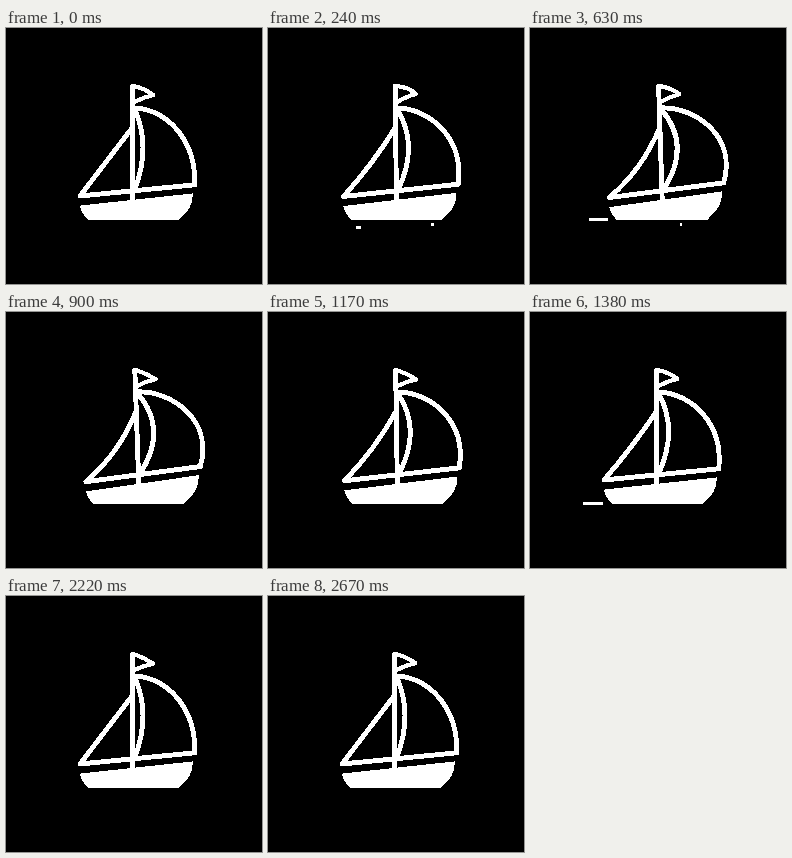
Animation of 256 by 256 pixels, one loop 2700 ms. Source, as an HTML page:

```html
<!DOCTYPE html>
<html lang="en">
<head>
<meta charset="utf-8">
<title>Sailing boat</title>
<style>
html, body { margin: 0; width: 100%; height: 100%; overflow: hidden; background: #000; }
svg { display: block; width: 100%; height: 100%; shape-rendering: crispEdges; }
</style>
</head>
<body>
<svg viewBox="0 0 256 256">
  <defs><clipPath id="water"><rect width="256" height="192"/></clipPath></defs>
  <g clip-path="url(#water)">
    <g id="boat" fill="none" stroke="#fff" stroke-width="4.9" stroke-linejoin="round" stroke-linecap="round">
      <path d="M126.8 58V173"/>
      <path d="M74 168L188.8 156.8"/>
      <path id="jib"/>
      <path id="main"/>
      <path id="flag" stroke-width="4.2"/>
      <path fill="#fff" stroke="none" d="M73.7 177.6L186.8 165.4Q187.5 180 174 190.5L170 195H86Q76 188 73.7 177.6Z"/>
    </g>
  </g>
  <g id="waves" stroke="#fff" stroke-width="3"></g>
</svg>
<script>
const LOOP = 2700;
const $ = id => document.getElementById(id);

// [time, value] pairs
const tilt = [[0, 0], [420, -1.1], [800, -2.1], [900, -2], [1170, -0.85], [1380, 0], [1650, 0.4], [1860, 0.3], [2160, 0], [LOOP, 0]];
const billow = [[0, 0], [420, 0.75], [650, 1], [900, 1], [1170, 0.55], [1380, 0.25], [1700, 0], [LOOP, 0]];

// x is the left end; each line draws leftwards, then wipes out leftwards
const waves = [
  { x: 72, y: 199.5, len: 19, start: 200, span: 430 },
  { x: 144, y: 196.5, len: 20, start: 220, span: 430 },
  { x: 53, y: 191.5, len: 19.5, start: 392, span: 440 },
  { x: 53, y: 191.5, len: 19.5, start: 1195, span: 480 }
];
for (const w of waves) {
  w.el = document.createElementNS('http://www.w3.org/2000/svg', 'line');
  w.el.setAttribute('y1', w.y);
  w.el.setAttribute('y2', w.y);
  $('waves').append(w.el);
}

const clamp = v => Math.max(0, Math.min(1, v));

// Smooth monotone interpolation through the keys
function sample(keys, t) {
  let i = 0;
  while (i < keys.length - 2 && t >= keys[i + 1][0]) i++;
  const slope = k => k < 0 || k > keys.length - 2 ? 0 :
    (keys[k + 1][1] - keys[k][1]) / (keys[k + 1][0] - keys[k][0]);
  const tangent = k => {
    const a = slope(k - 1), b = slope(k);
    return a * b <= 0 ? 0 : 2 * a * b / (a + b);
  };
  const [t0, v0] = keys[i], [t1, v1] = keys[i + 1];
  const d = t1 - t0, u = (t - t0) / d, s = u * u * (3 - 2 * u);
  return v0 + (v1 - v0) * s +
    d * u * (1 - u) * ((1 - u) * tangent(i) - u * tangent(i + 1));
}

function draw(t) {
  const angle = sample(tilt, t);
  const b = sample(billow, t);
  $('boat').setAttribute('transform', `rotate(${angle} 127 0)`);
  $('jib').setAttribute('d', `M74 168Q${100 + 9 * b} ${134 + 6 * b} 126.8 99`);
  $('main').setAttribute('d',
    `M129 80C${160 + 2 * b} ${82 - 2 * b} ${190 + 14 * b} 110 188.8 156.8M129 82Q${145 + 13 * b} 118 129 161`);

  const f = Math.sin(t / LOOP * 4 * Math.PI);
  $('flag').setAttribute('d',
    `M127.6 58Q${139 + f} ${60.5 - 1.5 * f} 147.3 ${67 - f}Q${138 + f} ${69 - f} 128.5 74`);

  const dx = -angle * Math.PI / 180 * 190;
  for (const w of waves) {
    const age = t - w.start;
    const left = w.x + w.len * (1 - clamp(age / 180));
    const right = w.x + w.len * (1 - clamp((age - w.span + 180) / 180));
    w.el.setAttribute('x1', left + dx);
    w.el.setAttribute('x2', right + dx);
    w.el.setAttribute('visibility', age > 0 && age < w.span ? 'visible' : 'hidden');
  }
}

let begin;
function tick(now) {
  begin ??= now;
  draw((now - begin) % LOOP);
  requestAnimationFrame(tick);
}
draw(0);
requestAnimationFrame(tick);
</script>
</body>
</html>
```
